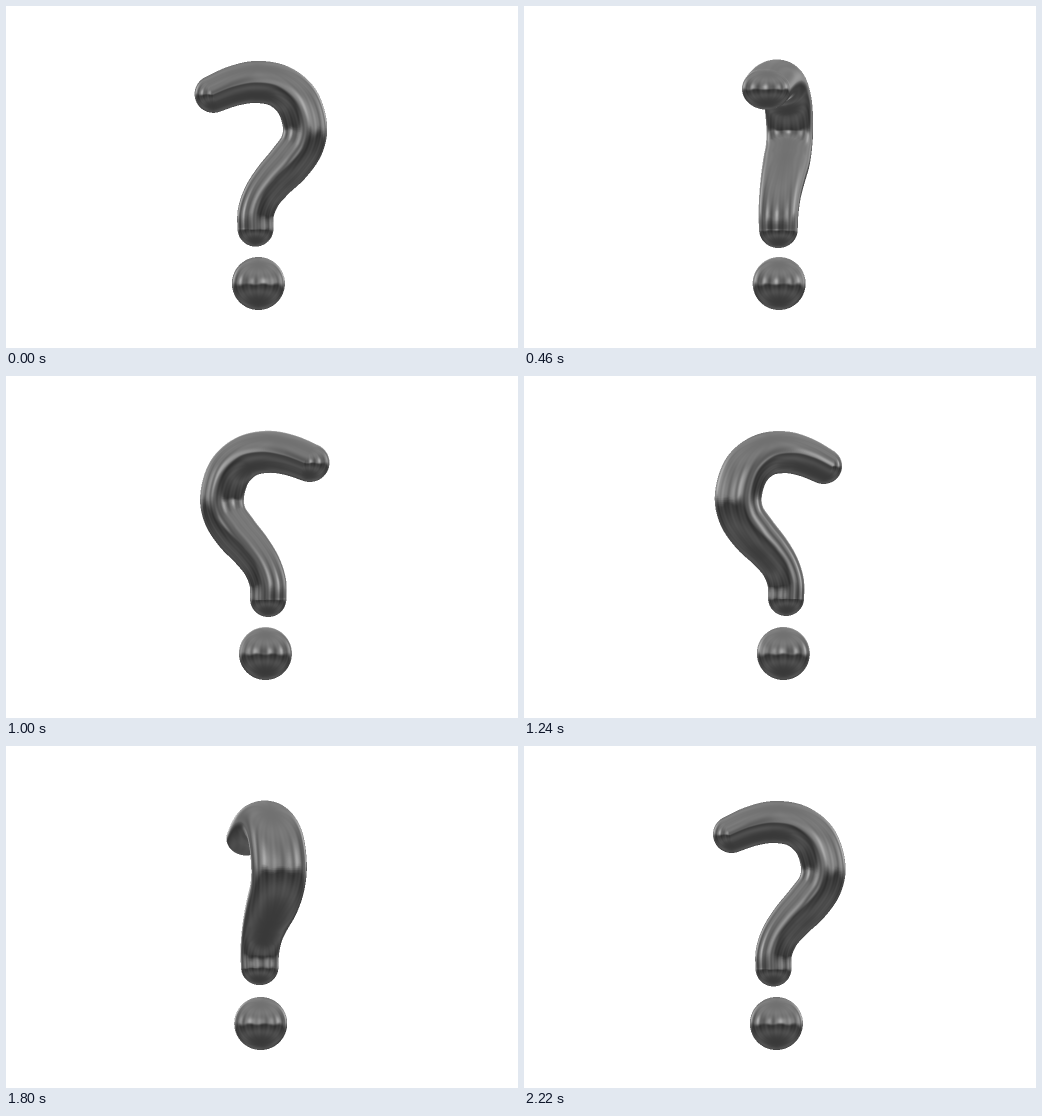
Recreate the animation shown at these times as an HTML page with a canvas. Size 512 by 342 pixels, loop 2.24 s.

```html
<!DOCTYPE html>
<html lang="en">
<head>
<meta charset="utf-8">
<title>Turning question mark</title>
<style>
  html, body { margin: 0; width: 100%; height: 100%; overflow: hidden; background: #fff; }
  canvas { display: block; width: 512px; height: 342px; }
</style>
</head>
<body>
<canvas id="stage" width="512" height="342"></canvas>
<script>
const ctx = document.getElementById('stage').getContext('2d');
const STEP = 20, STEPS = 112;
const CX = 256, CY = 171, CAM = 450, TILT = 0.08, PHASE = 0.03;
const LEFT = 184, TOP = 48, W = 144, H = 260, SS = 2;
const SW = W * SS, SH = H * SS;

// Centre line of the hook: x, y, radius
const spine = [
  [207.5, 88.2, 18.7], [228, 80, 20], [250, 76, 21], [273, 80, 21.5],
  [291, 95, 22.2], [299, 119, 22.2], [296, 139, 22], [283.5, 157, 22],
  [268.5, 173, 20.5], [256.5, 189, 19], [250, 206, 18.3], [249.5, 222.5, 18]
];

// Bright windows of the surroundings: azimuth in degrees, width, strength
const windows = [
  [22, 20, 1], [70, 24, 0.6], [118, 12, 0.7], [152, 16, 0.9],
  [-142, 12, 0.9], [-88, 13, 1], [-30, 12, 0.8]
];

const catmull = (a, b, c, d, u) =>
  b + 0.5 * u * (c - a + u * (2 * a - 5 * b + 4 * c - d + u * (3 * (b - c) + d - a)));

function spineAt(pos) {
  const last = spine.length - 1;
  const i = Math.max(0, Math.min(last - 1, Math.floor(pos))), u = pos - i;
  const at = k => spine[Math.max(0, Math.min(last, k))];
  return [0, 1, 2].map(k =>
    catmull(at(i - 1)[k], at(i)[k], at(i + 1)[k], at(i + 2)[k], u));
}

// Each blob is an ellipsoid; along the tube it also knows its tangent and taper
function buildBlobs() {
  const list = [], per = 26, total = (spine.length - 1) * per;
  for (let n = 0; n <= total; n++) {
    const [x, y, r] = spineAt(n / per), part = n / total;
    const blob = { x: x - CX, y: y - CY, r, deep: 1.19 - 0.13 * part * part };
    if (n > 0 && n < total) {
      const a = spineAt((n - 0.5) / per), b = spineAt((n + 0.5) / per);
      const len = Math.hypot(b[0] - a[0], b[1] - a[1]);
      blob.tube = { x: (b[0] - a[0]) / len, y: (b[1] - a[1]) / len, slope: (b[2] - a[2]) / len };
    }
    list.push(blob);
  }
  list.push({ x: -3.6, y: 106.5, r: 26.5, deep: 1 });
  return list;
}

const bell = (v, w) => Math.exp(-v * v / (w * w));
const smooth = (a, b, v) => {
  const t = Math.max(0, Math.min(1, (v - a) / (b - a)));
  return t * t * (3 - 2 * t);
};

// Window brightness by azimuth, one entry per degree
const glow = Array.from({ length: 361 }, (_, d) =>
  windows.reduce((sum, [a, w, s]) => {
    const gap = ((d - 180 - a + 540) % 360) - 180;
    return sum + s * bell(gap, w);
  }, 0));

// Reflected grey for a direction; e is the height above the horizon
function surroundings(x, e, z) {
  const a = Math.atan2(x, z);
  const g = glow[Math.round(a * 180 / Math.PI) + 180];
  const flat = 1 - Math.abs(e);
  const streak = (Math.sin(7 * a + 1) + 0.7 * Math.sin(17 * a + 2)) * flat;
  const sky = 108 + 12 * bell(e - 0.75, 0.25) + (78 * g - 16) * bell(e - 0.16, 0.26) + 8 * streak;
  const floor = 54 + 22 * bell(e + 0.6, 0.28) + 7 * streak;
  const horizon = -0.05 + 0.04 * Math.sin(5 * a);
  return floor + (sky - floor) * smooth(horizon - 0.12, horizon + 0.12, e);
}

const blobs = buildBlobs();
const depth = new Float32Array(SW * SH);
const nx = new Float32Array(SW * SH);
const ny = new Float32Array(SW * SH);
const nz = new Float32Array(SW * SH);

// Draws one ellipsoid into the depth and normal buffers
function splat(b, c, s) {
  const tube = b.tube;
  const z0 = b.deep > 1 ? -b.x * s : 0;
  const m = CAM / (CAM - z0);
  const px = (CX + b.x * c * m - LEFT) * SS;
  const py = (CY + (b.y + TILT * z0) * m - TOP) * SS;
  const unit = 1 / (m * SS), reach = b.r * b.deep / unit, tall = b.r / unit;
  const k = 1 / (b.deep * b.deep);
  const A = s * s + c * c * k, B = s * c * (k - 1), C = c * c + s * s * k;
  const y1 = Math.min(SH - 1, Math.floor(py + tall));
  const x1 = Math.min(SW - 1, Math.floor(px + reach));
  for (let j = Math.max(0, Math.floor(py - tall)); j <= y1; j++) {
    const y = (j + 0.5 - py) * unit, rest = y * y - b.r * b.r;
    if (rest >= 0) continue;
    for (let i = Math.max(0, Math.floor(px - reach)); i <= x1; i++) {
      const x = (i + 0.5 - px) * unit, half = B * x;
      const disc = half * half - A * (C * x * x + rest);
      if (disc < 0) continue;
      const z = (Math.sqrt(disc) - half) / A, p = j * SW + i;
      if (z0 + z <= depth[p]) continue;
      depth[p] = z0 + z;
      let X = x * c - z * s, Y = y;
      if (tube) {
        // Keeps the tube smooth between neighbouring blobs
        const fix = -tube.slope * b.r - X * tube.x - Y * tube.y;
        X += fix * tube.x;
        Y += fix * tube.y;
      }
      nx[p] = X;
      ny[p] = -Y;
      nz[p] = (x * s + z * c) * k;
    }
  }
}

function shade(p, c, s) {
  if (depth[p] === -Infinity) return 255;
  const len = Math.hypot(nx[p], ny[p], nz[p]);
  const X = nx[p] / len, Y = ny[p] / len, Z = nz[p] / len;
  const facing = Z * c - X * s;
  const grey = surroundings(2 * facing * X + s, 2 * facing * Y, 2 * facing * Z - c);
  const rim = Math.pow(1 - Math.max(0, facing), 4);
  return Math.min(212, grey + rim * (Y > 0 ? 45 : 22));
}

function render(step) {
  const angle = step / STEPS * 2 * Math.PI + PHASE;
  const c = Math.cos(angle), s = Math.sin(angle);
  depth.fill(-Infinity);
  for (const b of blobs) splat(b, c, s);
  const img = ctx.createImageData(W, H);
  for (let j = 0, o = 0; j < H; j++) {
    for (let i = 0; i < W; i++, o += 4) {
      const p = j * SS * SW + i * SS;
      const v = (shade(p, c, s) + shade(p + 1, c, s) +
        shade(p + SW, c, s) + shade(p + SW + 1, c, s)) / 4;
      img.data[o] = img.data[o + 1] = img.data[o + 2] = v;
      img.data[o + 3] = 255;
    }
  }
  return img;
}

const cache = [];
const start = performance.now();
let shown = -1;

function tick() {
  const step = Math.floor((performance.now() - start) / STEP) % STEPS;
  if (step !== shown) {
    cache[step] = cache[step] || render(step);
    ctx.putImageData(cache[step], LEFT, TOP);
    shown = step;
  }
  requestAnimationFrame(tick);
}

ctx.fillStyle = '#fff';
ctx.fillRect(0, 0, 512, 342);
tick();
</script>
</body>
</html>
```
